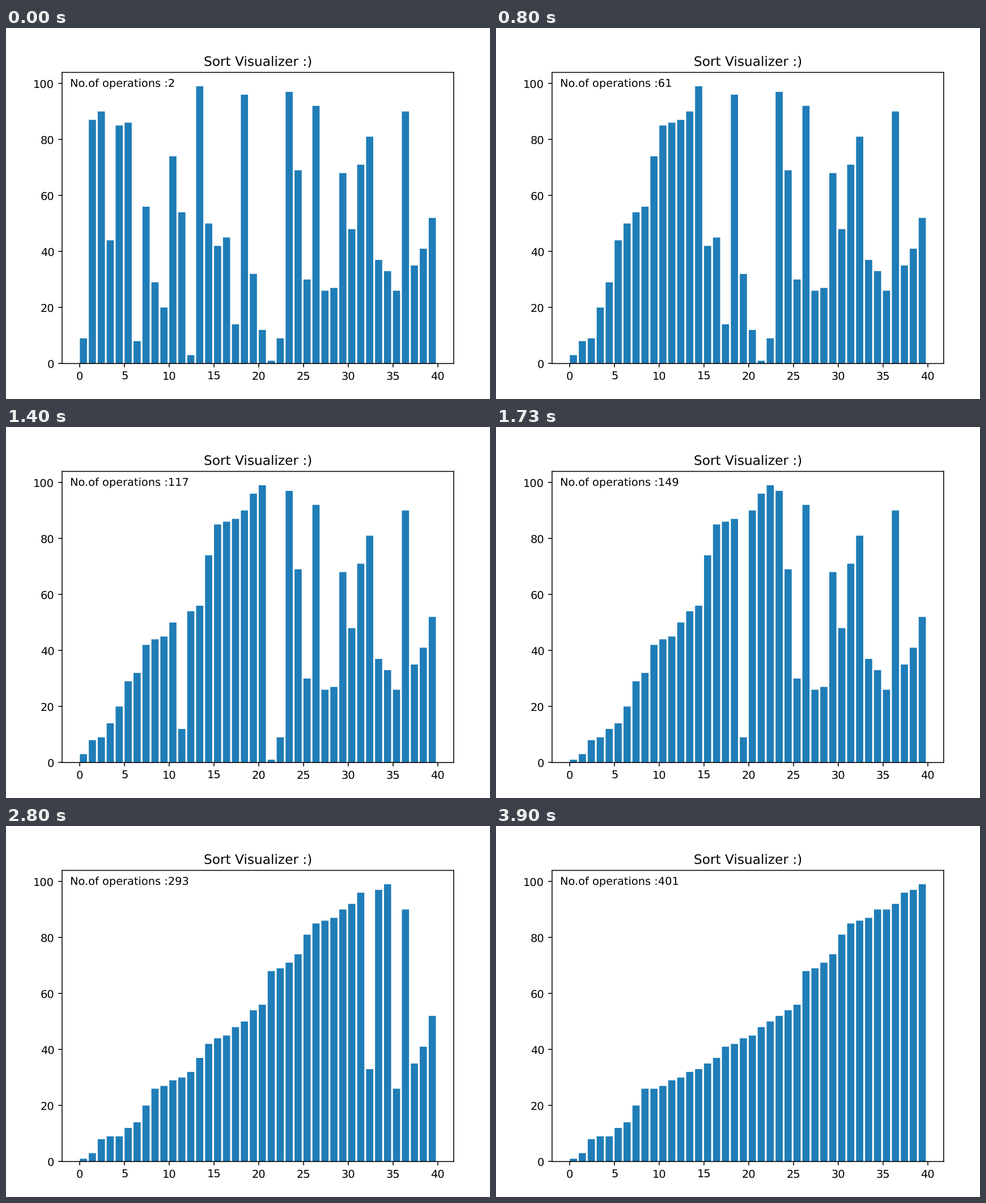
Write a matplotlib script that moves like this. It is 854 px wide and 656 px high and loops after 4310 ms.

```python
import matplotlib.pyplot as plt
import numpy as np
from matplotlib.animation import FuncAnimation

W, H, DPI = 854, 656, 139.3
LOOP, STEP = 4310, 10  # ms

# The numbers to sort
VALUES = [9, 87, 90, 44, 85, 86, 8, 56, 29, 20, 74, 54, 3, 99, 50, 42, 45, 14, 96, 32,
          12, 1, 9, 97, 69, 30, 92, 26, 27, 68, 48, 71, 81, 37, 33, 26, 90, 35, 41, 52]

# The sort speeds up as it runs: swaps done by a few moments in seconds
PACE = {0: 0, 0.8: 59, 1.1: 85, 1.73: 147, 2.13: 196, 2.8: 291, 3.47: 399}


def insertion_sort(values):
    """Yield the list at the start and after every swap."""
    a = list(values)
    yield a[:]
    for i in range(1, len(a)):
        j = i
        while j > 0 and a[j - 1] > a[j]:
            a[j - 1], a[j] = a[j], a[j - 1]
            j -= 1
            yield a[:]


states = list(insertion_sort(VALUES))

# The chart refreshes four times in every seven ticks of a 30 Hz clock
refreshes = np.round(np.arange(62) * 7 // 4 / 30, 2)
swaps = np.round(np.interp(refreshes, list(PACE), list(PACE.values()))).astype(int)

plt.rcParams.update({"path.snap": False, "text.hinting": "none"})

# The small surplus keeps the pixel size from rounding down
fig = plt.figure(figsize=((W + 1e-6) / DPI, (H + 1e-6) / DPI), dpi=DPI, facecolor="white")
ax = fig.add_axes([98.9 / W, 62.7 / H, 691 / W, 514.8 / H])
ax.set_title("Sort Visualizer :)")
bars = ax.bar(range(len(VALUES)), VALUES, width=0.8, align="edge", color="#1f7db7")
ax.set_xlim(-1.99, 41.79)
ax.set_ylim(0, 103.95)
ax.set_xticks(range(0, 41, 5))
ax.set_yticks(range(0, 101, 20))
label = ax.text(0.02, 0.95, "", transform=ax.transAxes)


def update(i):
    now = i * STEP / 1000 + 1e-6
    k = swaps[np.searchsorted(refreshes, now) - 1]
    for bar, height in zip(bars, states[k]):
        bar.set_height(height)
    label.set_text(f"No.of operations :{k + 2}")
    return [*bars, label]


anim = FuncAnimation(fig, update, frames=LOOP // STEP, interval=STEP,
                     repeat=True, repeat_delay=0)
plt.show()
```
